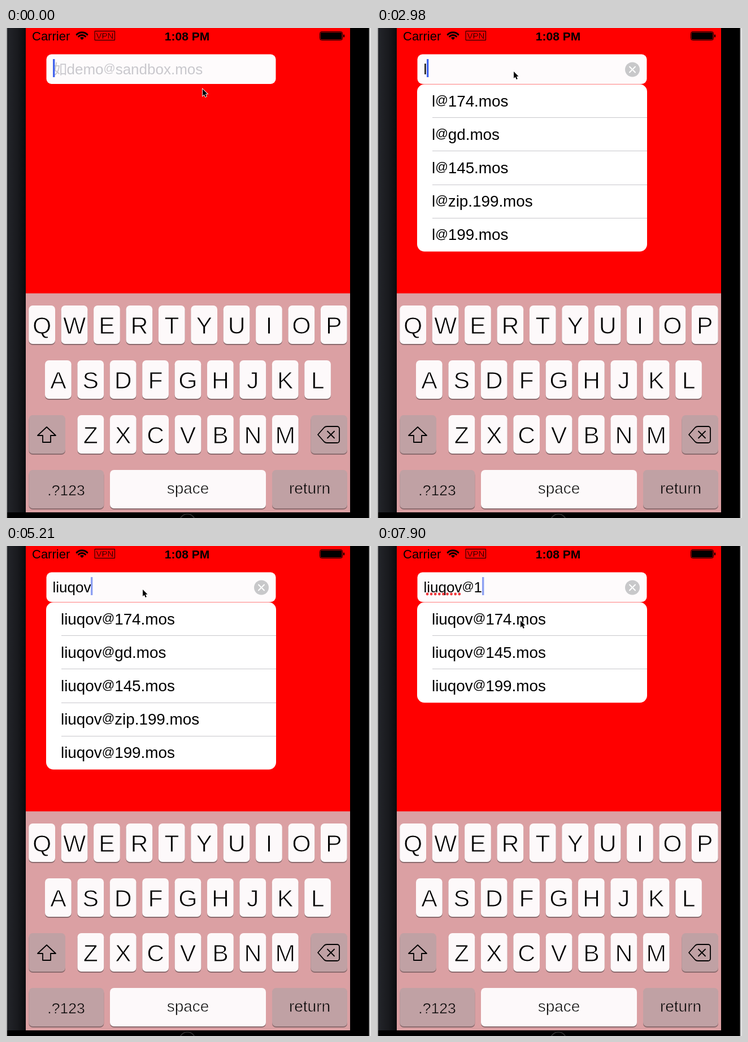
These frames come from a looping animation (646 px wide and 867 px high, 8 s). An HTML page with a canvas:

```html
<!DOCTYPE html>
<html lang="en">
<head>
<meta charset="utf-8">
<title>Address completion</title>
<style>
  html, body { margin: 0; width: 100%; height: 100%; overflow: hidden; background: #000; }
  canvas { display: block; }
</style>
</head>
<body>
<canvas id="stage" width="646" height="867"></canvas>
<script>
const ctx = document.getElementById('stage').getContext('2d');
const SANS = '"Liberation Sans", Arial, sans-serif';
const LOOP = 8000;
const STEP = 150;
const ROW_HEIGHT = 59.2;
const PAPER = '#fefbfc';
const KEY = '#fdf9fa';
const DARK_KEY = '#c0a1a4';

const typing = [
  [0, ''], [2980, 'l'], [3580, 'li'], [3880, 'liu'], [4020, 'liuq'],
  [4170, 'liuqov'], [6400, 'liuqov@'], [6850, 'liuqov@1']
];
const domains = ['174.mos', 'gd.mos', '145.mos', 'zip.199.mos', '199.mos'];
const blinks = [140, 1190, 2230, 4770, 5810, 7450];
const moves = [
  { start: 740, end: 1490, from: [348, 108], to: [242, 77] },
  { start: 5360, end: 5810, from: [242, 77], to: [254, 99] },
  { start: 7750, end: 7900, from: [254, 99], to: [254, 132] }
];

function box(x, y, w, h, r, fill) {
  ctx.beginPath();
  ctx.roundRect(x, y, w, h, r);
  ctx.fillStyle = fill;
  ctx.fill();
}

function line(points, close) {
  ctx.beginPath();
  points.forEach(([x, y]) => ctx.lineTo(x, y));
  if (close) ctx.closePath();
}

function label(str, x, y, size, { color = '#000', align = 'left', weight = 400, thin = 0, back = KEY } = {}) {
  ctx.font = `${weight} ${size}px ${SANS}`;
  ctx.textAlign = align;
  ctx.fillStyle = color;
  ctx.fillText(str, x, y);
  if (thin) {
    // An edge in the background colour gives a lighter weight.
    ctx.strokeStyle = back;
    ctx.lineWidth = thin;
    ctx.lineJoin = 'round';
    ctx.strokeText(str, x, y);
  }
}

// Sets an address with a small, raised at sign; returns the end of the text.
function address(str, x, y, size, color = '#000') {
  ctx.textAlign = 'left';
  ctx.fillStyle = color;
  for (const part of str.split(/(@)/)) {
    const isAt = part === '@';
    ctx.font = `${isAt ? size * 0.8 : size}px ${SANS}`;
    ctx.fillText(part, x, isAt ? y - size * 0.13 : y);
    x += ctx.measureText(part).width;
  }
  return x;
}

function drawBezel() {
  ctx.fillStyle = '#000';
  ctx.fillRect(0, 0, 646, 867);
  const shade = ctx.createLinearGradient(2, 0, 35, 0);
  shade.addColorStop(0, '#23252a');
  shade.addColorStop(0.55, '#191a1e');
  shade.addColorStop(1, '#0b0c0e');
  ctx.fillStyle = shade;
  ctx.fillRect(2, 0, 33, 857);
  ctx.fillStyle = '#b4b4b4';
  ctx.fillRect(0, 0, 2, 867);
  ctx.fillStyle = '#555';
  ctx.fillRect(642, 0, 1, 867);
  ctx.fillStyle = '#b4b4b4';
  ctx.fillRect(643, 0, 1, 867);
  ctx.fillStyle = '#e4e4e4';
  ctx.fillRect(644, 0, 2, 867);
  ctx.beginPath();
  ctx.arc(321, 874, 14, 0, Math.PI * 2);
  ctx.strokeStyle = '#333';
  ctx.lineWidth = 1.5;
  ctx.stroke();
  ctx.fillStyle = '#f00';
  ctx.fillRect(35, 0, 574, 470);
}

function drawStatusBar() {
  label('Carrier', 46, 22, 22);
  label('1:08 PM', 320.5, 21.5, 21, { align: 'center', weight: 700 });

  const [left, right] = [-Math.PI * 0.75, -Math.PI * 0.25];
  ctx.fillStyle = ctx.strokeStyle = '#000';
  ctx.lineWidth = 3;
  ctx.beginPath();
  ctx.moveTo(134.5, 21);
  ctx.arc(134.5, 21, 5, left, right);
  ctx.fill();
  for (const r of [8.5, 13.3]) {
    ctx.beginPath();
    ctx.arc(134.5, 21, r, left, right);
    ctx.stroke();
  }

  ctx.lineWidth = 1;
  ctx.strokeRect(157.5, 5.5, 35, 16);
  label('VPN', 175, 19, 15, { align: 'center', thin: 0.4, back: '#f00' });

  ctx.strokeStyle = '#000';
  ctx.lineWidth = 1;
  ctx.beginPath();
  ctx.roundRect(555.5, 6.5, 40, 15, 3);
  ctx.stroke();
  box(556.7, 7.7, 37.6, 12.6, 1.5, '#000');
  box(597, 11.5, 2, 5, 1, '#000');
}

function key(x, y, w, fill = KEY) {
  box(x, y + 2, w, 68, 7, '#8b6b6e');
  box(x, y, w, 68, 7, fill);
}

function drawKeyboard() {
  ctx.fillStyle = '#dba0a3';
  ctx.fillRect(35, 469.5, 574, 387.5);
  const rows = [['QWERTYUIOP', 40.3, 491], ['ASDFGHJKL', 69, 588], ['ZXCVBNM', 126.5, 685]];
  for (const [letters, x0, y] of rows) {
    [...letters].forEach((letter, i) => {
      const x = x0 + i * 57.4;
      key(x, y, 46.7);
      label(letter, x + 23.4, y + 50, 42.8, { align: 'center', thin: 1 });
    });
  }
  key(40.3, 685, 64.7, DARK_KEY);
  key(539.3, 685, 64.7, DARK_KEY);
  key(40.3, 782, 133, DARK_KEY);
  key(184, 782, 276, KEY);
  key(471, 782, 133, DARK_KEY);
  label('.?123', 106.5, 826.5, 26.5, { align: 'center', thin: 0.6, back: DARK_KEY });
  label('space', 322, 824, 28, { align: 'center', thin: 0.7 });
  label('return', 537.5, 824, 28, { align: 'center', thin: 0.7, back: DARK_KEY });

  ctx.strokeStyle = '#000';
  ctx.lineWidth = 1.8;
  ctx.lineJoin = ctx.lineCap = 'round';
  line([[72, 706], [88, 721], [79, 721], [79, 733], [65, 733], [65, 721], [56, 721]], true);
  ctx.stroke();
  ctx.beginPath();
  ctx.moveTo(552, 719.5);
  ctx.lineTo(563, 707);
  ctx.quadraticCurveTo(565, 705, 568, 705);
  ctx.arcTo(590, 705, 590, 709, 4);
  ctx.arcTo(590, 734, 586, 734, 4);
  ctx.lineTo(568, 734);
  ctx.quadraticCurveTo(565, 734, 563, 732);
  ctx.closePath();
  ctx.stroke();
  drawCross(575, 719.5, 6);
}

function drawCross(x, y, r) {
  for (const s of [-1, 1]) {
    line([[x - r, y - r * s], [x + r, y + r * s]]);
    ctx.stroke();
  }
}

function drawField(text, caret) {
  box(71.5, 46.5, 406, 52.5, 9, PAPER);
  let end = 82.5;
  if (text) {
    end = address(text, end, 81.5, 26);
    ctx.beginPath();
    ctx.arc(452, 73.5, 13, 0, Math.PI * 2);
    ctx.fillStyle = '#c8c8ca';
    ctx.fill();
    ctx.strokeStyle = '#fff';
    ctx.lineWidth = 2;
    ctx.lineCap = 'round';
    drawCross(452, 73.5, 5);
  } else {
    ctx.font = '300 25px "Noto Sans CJK SC", "Noto Sans CJK", "Noto Sans CJK JP", sans-serif';
    ctx.textAlign = 'left';
    ctx.fillStyle = '#c9c8cd';
    ctx.fillText('如', 83, 81.5);
    address('demo@sandbox.mos', 107.5, 81.5, 26, '#c9c8cd');
  }
  if (text.includes('@')) {
    ctx.fillStyle = '#f0383c';
    for (let i = 0; i < 9; i++) {
      ctx.beginPath();
      ctx.arc(89 + i * 7.1, 85, 2.4, 0, Math.PI * 2);
      ctx.fill();
    }
  }
  ctx.globalAlpha = caret;
  ctx.fillStyle = '#4365ee';
  ctx.fillRect(text ? Math.floor(end) : 83, 55, 3.4, 32);
  ctx.globalAlpha = 1;
}

function drawList(text) {
  if (!text) return;
  const [user, typed = ''] = text.split('@');
  const matches = domains.filter(domain => domain.startsWith(typed));
  box(71, 99.6, 407, matches.length * ROW_HEIGHT, 13, '#fff');
  matches.forEach((domain, i) => {
    const y = 100 + i * ROW_HEIGHT;
    address(`${user}@${domain}`, 97, y + 38.5, 27.8);
    if (i) {
      ctx.fillStyle = '#c8c7cc';
      ctx.fillRect(98, Math.round(y - 1), 380, 1);
    }
  });
}

function drawPointer([x, y]) {
  ctx.save();
  ctx.translate(x, y);
  ctx.scale(0.85, 0.85);
  line([[0, 0], [0, 14], [3.2, 11.2], [5.6, 16.4], [8, 15.4], [5.7, 10.2], [10, 10]], true);
  ctx.lineJoin = 'miter';
  ctx.strokeStyle = '#fff';
  ctx.lineWidth = 2;
  ctx.stroke();
  ctx.fillStyle = '#000';
  ctx.fill();
  ctx.restore();
}

function caretAlpha(t) {
  const start = blinks.findLast(time => time <= t);
  if (start === undefined) return 1;
  const age = t - start;
  if (age < STEP) return 0.55;
  if (age < 440) return 0;
  return age < 590 ? 0.6 : 1;
}

function pointerAt(t) {
  const move = moves.findLast(m => m.start <= t) || moves[0];
  const { start, end, from, to } = move;
  const stepped = Math.floor((t - start) / STEP) * STEP;
  const p = Math.min(1, Math.max(0, stepped / (end - start)));
  const ease = p * p * (3 - 2 * p);
  return from.map((v, i) => Math.round(v + (to[i] - v) * ease));
}

function draw(t) {
  const text = typing.findLast(([time]) => time <= t)[1];
  drawBezel();
  drawStatusBar();
  drawKeyboard();
  drawField(text, caretAlpha(t));
  drawList(text);
  drawPointer(pointerAt(t));
}

const begin = performance.now();
function tick() {
  draw((performance.now() - begin) % LOOP);
  requestAnimationFrame(tick);
}
tick();
</script>
</body>
</html>
```
